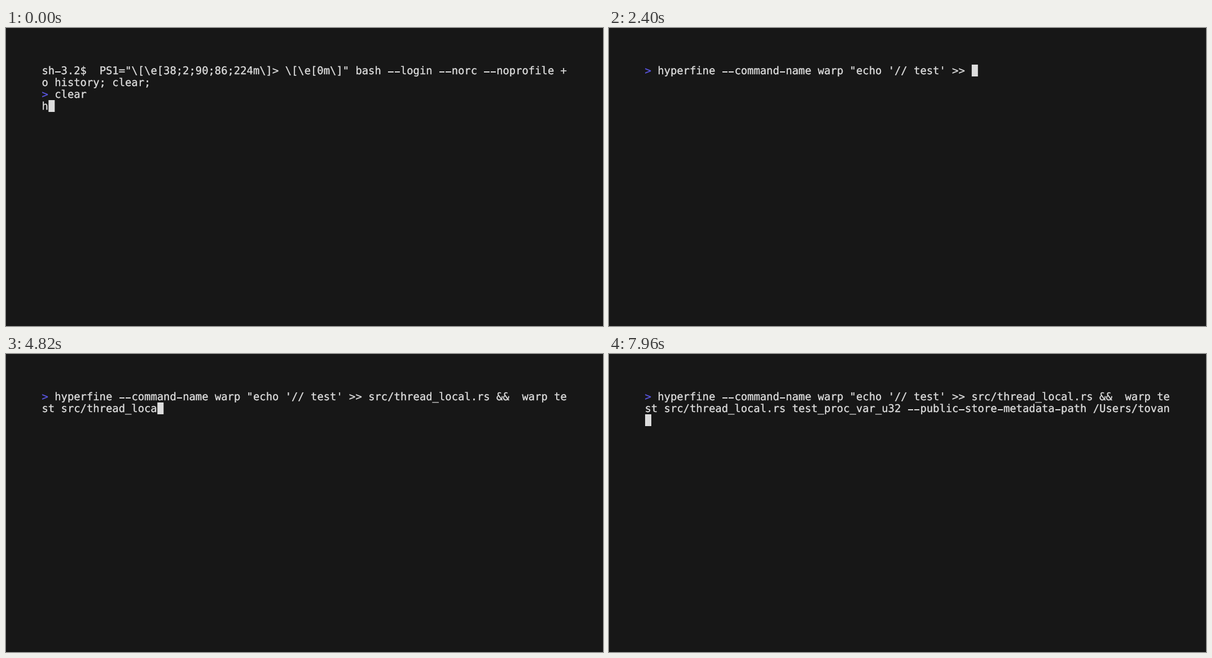
Write an HTML page that moves like this. It is 1058 px wide and 529 px high and loops after 8000 ms.

```html
<!DOCTYPE html>
<html lang="en">
<head>
<meta charset="utf-8">
<title>Terminal</title>
<style>
  html, body { margin: 0; width: 100%; height: 100%; overflow: hidden; background: #171717; }
  #term {
    position: absolute; left: 63.5px; top: 66px;
    color: #ddd; white-space: pre;
    font: 18.85px/21px "DejaVu Sans Mono", monospace;
    font-variant-ligatures: none; font-kerning: none;
    text-rendering: geometricPrecision;
    -webkit-text-stroke: 0.35px currentColor;
  }
  .prompt { color: #5a56e0; }
  /* long hyphen, drawn over the real character */
  .dash { position: relative; color: transparent; }
  .dash::before {
    content: ""; position: absolute; left: 1px; top: 10.9px;
    width: 9.4px; height: 1.8px; background: #ddd;
  }
  #cursor {
    position: absolute; left: 63.5px; top: 65px;
    width: 11.35px; height: 21px; background: #ddd;
  }
</style>
</head>
<body>
<div id="term"></div>
<div id="cursor"></div>
<script>
const LOOP = 8000, TICK = 20, CLEAR_AT = 60;
const KEY_MS = 49.5, LEAD_MS = 10;
const COLS = 82, CELL_W = 11.349, CELL_H = 21;

const setup = [
  'sh-3.2$  PS1="\\[\\e[38;2;90;86;224m\\]> \\[\\e[0m\\]" bash --login --norc --noprofile +',
  'o history; clear;',
  '> clear'
];
const command = 'hyperfine --command-name warp "echo \'// test\' >> src/thread_local.rs &&  ' +
  'warp test src/thread_local.rs test_proc_var_u32 --public-store-metadata-path /Users/tovan';

const term = document.getElementById('term');
const cursor = document.getElementById('cursor');

// steady typing; the first key is already down when the loop starts
const typedAt = t => 1 + Math.floor((t + LEAD_MS) / KEY_MS);

function wrap(text) {
  const rows = [];
  for (let i = 0; i <= text.length; i += COLS) rows.push(text.slice(i, i + COLS));
  return rows;
}

function markup(row) {
  return row.replace(/&/g, '&amp;').replace(/</g, '&lt;').replace(/>/g, '&gt;')
    .replace(/-/g, '<span class="dash">-</span>')
    .replace(/^&gt;/, '<span class="prompt">&gt;</span>');
}

let shown = '';
function render(now) {
  const t = Math.floor(now % LOOP / TICK) * TICK;
  const typed = command.slice(0, typedAt(t));
  const rows = t < CLEAR_AT ? [...setup, typed] : wrap('> ' + typed);
  const key = rows.join('\n');
  if (key === shown) return;
  shown = key;
  term.innerHTML = rows.map(markup).join('\n');
  const y = rows.length - 1, x = rows[y].length;
  cursor.style.transform = `translate(${x * CELL_W}px, ${y * CELL_H}px)`;
}

const start = performance.now();
function loop() {
  render(performance.now() - start);
  requestAnimationFrame(loop);
}
loop();
</script>
</body>
</html>
```
